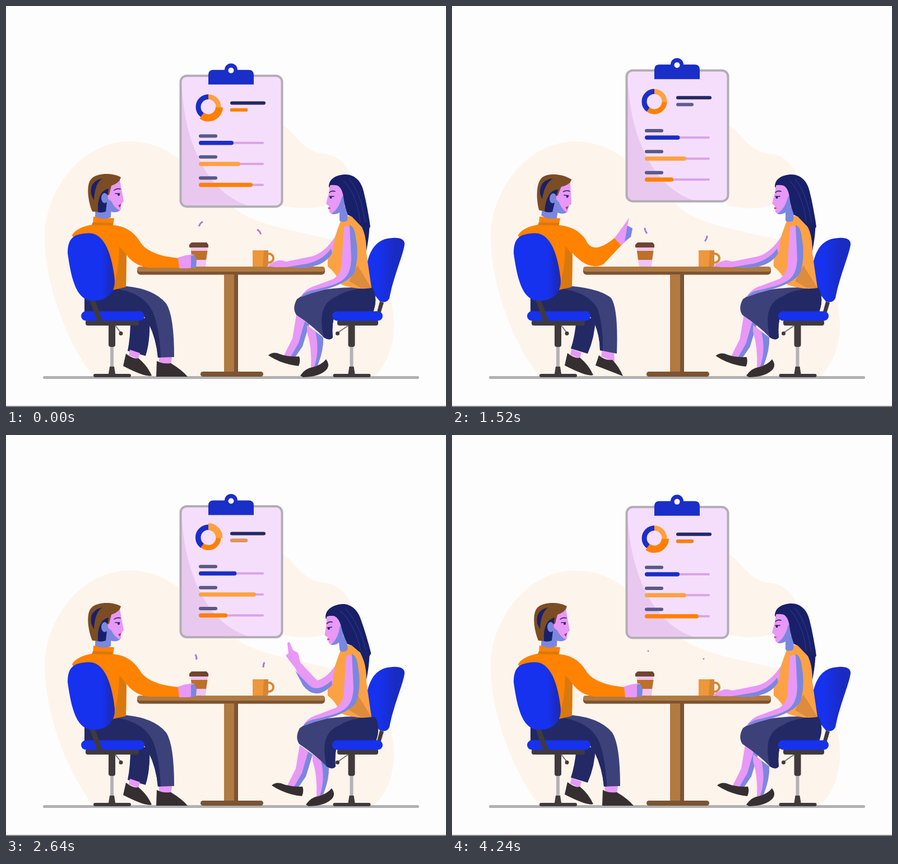
These frames come from a looping animation (785 by 714 pixels, 4.32 s). An HTML page:

```html
<!DOCTYPE html>
<html lang="en">
<head>
<meta charset="utf-8">
<title>Meeting</title>
<style>
html, body { margin: 0; height: 100%; overflow: hidden; background: #fdfdfd }
svg { display: block; width: 785px; height: 714px }
.skin { fill: #e898f7 } .cool { fill: #7b87df } .pink { fill: #efc3f5 }
.navy { fill: #3c4179 } .deep { fill: #232965 } .shoe { fill: #352f31 }
.blue { fill: #1632ee } .dark { fill: #403a3d }
.orange { fill: #ff8200 } .rust { fill: #d9780f } .peach { fill: #fca245 } .tan { fill: #dd8b3c }
.wood { fill: #b07a42 } .edge { fill: #7c5433 } .hair { fill: #18206a }
.thin { fill: none; stroke-linecap: round; stroke-width: 1.6; stroke: #2a2560 }
</style>
</head>
<body>
<svg viewBox="0 0 785 714">
  <linearGradient id="backL"><stop offset=".72" stop-color="#1632ee"/><stop offset=".92" stop-color="#1a2bbd"/></linearGradient>
  <linearGradient id="backR"><stop offset=".3" stop-color="#1632ee"/><stop offset=".75" stop-color="#1a2bc4"/></linearGradient>
  <path fill="#fdf4ec" d="M158 661C128 630 70 520 69 410C70 330 132 242 220 241C275 243 296 262 330 290L412 364C460 398 560 405 620 428C668 450 688 505 692 560C694 600 680 640 655 661ZM490 210C520 225 525 262 575 264C600 272 615 290 618 315C602 350 560 370 490 355Z"/>
  <rect x="66" y="659" width="671" height="5" rx="2.5" fill="#b2b0b2"/>
  <rect y="712" width="785" height="2" fill="#858585"/>

  <g id="board">
    <rect x="311.500" y="123.500" width="181" height="233" rx="11" fill="#f5defc"/>
    <path fill="#e9c8f0" d="M313 135C318 245 360 335 436 356H324Q313 356 313 344Z"/>
    <rect x="311.500" y="123.500" width="181" height="233" rx="11" fill="none" stroke="#b3adb5" stroke-width="4"/>
    <path fill="#1a2ec8" d="M361 139V122Q361 113 370 113H390A11.500 11.500 0 0 1 413 113H433Q442 113 442 122V139Z"/>
    <circle cx="401.500" cy="114" r="5" fill="#fdf6ff"/>
    <g id="content"></g>
  </g>

  <!-- woman -->
  <path fill="url(#backR)" d="M643 465C648 435 660 414 690 413C704 412 712 416 711 425C708 445 692 480 684 520Q680 530 667 526L646 500Z"/>
  <path class="dark" d="M667 526L674 528L668 548H661Z"/>
  <g id="lap">
    <g id="farFoot">
      <path class="skin" d="M518 550L540 566L528 605L514 628L496 622L511 592Z"/>
      <path class="cool" d="M533 562L541 567L529 606L514 628L507 626L522 600Z"/>
      <path class="shoe" d="M468 622Q474 616 484 618Q500 625 523 624Q526 632 522 641Q492 638 468 622Z"/>
    </g>
    <g id="nearFoot">
      <path class="skin" d="M537 568L566 590Q567 612 556 640L544 644Q546 608 537 580Z"/>
      <path class="cool" d="M552 580L566 590Q567 612 556 640L550 642Q560 612 552 580Z"/>
      <path class="shoe" d="M525 658Q534 645 547 643Q563 639 571 629Q578 638 573 646Q562 660 530 661Z"/>
    </g>
    <path class="navy" d="M535 511Q590 498 654 502Q664 520 655 545H590Q580 560 583 590Q578 597 567 590Q548 570 518 550Q510 538 519 522Z"/>
    <path class="deep" d="M590 517Q610 503 654 502Q664 520 655 545H590Q580 560 583 590Q578 597 567 590C560 560 560 528 590 517Z"/>
  </g>
  <path class="hair" d="M625 370L648 380Q650 400 643 436Q638 420 637 400Z"/>
  <path class="peach" d="M598 380Q612 370 622 377Q644 395 643 440L652 502Q625 506 598 496Q588 474 574 464Q572 446 586 414Q592 396 598 380Z"/>
  <path class="tan" d="M627 462L652 502H633L612 490Z"/>
  <g id="herHead">
    <path class="hair" d="M576 322C576 306 592 300 606 300C622 300 634 312 638 330C643 350 647 372 650 393L643 402L618 376L600 352Z"/>
    <path class="cool" d="M595 350L612 345L609 382Q600 387 595 382Z"/>
    <path class="skin" d="M578 318L576 333L571 352L576 356L577 367Q584 374 596 367L608 352Q610 332 596 320Z"/>
    <path class="cool" d="M600 338L610 342L600 364Q590 373 580 370Q594 362 600 338Z"/>
    <path class="hair" d="M576 320Q598 312 602 340Q604 356 610 372L628 380L626 320L600 304L580 310Z"/>
    <path class="thin" d="M577 332Q581 328 587 330M577 339L585 339"/>
    <circle class="hair" cx="579.500" cy="341" r="2"/>
    <path d="M575 358L580 360L575 362Z" fill="#c0407c"/>
    <path d="M603 312Q626 335 632 385M612 308Q634 335 641 386" fill="none" stroke="#27327f" stroke-width="1.500"/>
  </g>

  <!-- table -->
  <rect class="edge" x="234" y="465" width="335" height="13.500" rx="6"/>
  <rect class="wood" x="234" y="464" width="335" height="9" rx="4.500"/>
  <rect class="wood" x="389" y="478" width="25" height="174"/>
  <rect class="edge" x="407" y="478" width="7" height="174"/>
  <rect class="edge" x="347" y="651" width="112" height="9" rx="4.500"/>
  <g id="steam"></g>
  <circle cx="469" cy="449" r="8" fill="none" stroke="#d98633" stroke-width="4"/>
  <path d="M440 435H468V460Q468 464 464 464H440Z" fill="#ee973b"/>
  <path d="M460 435H468V460Q468 464 464 464H458Z" fill="#d98633"/>
  <path class="pink" d="M329 429H360L356 464H334Z"/>
  <path d="M330 436H359.500L357 452H332Z" fill="#bd7027"/>
  <path d="M331 421H358L361 425V430H327V425Z" fill="#70452f"/>
  <path id="herArm" class="skin"/>
  <path id="herArmShade" class="cool"/>
  <g id="nearArm">
    <path class="skin" d="M603 394Q616 386 622 407Q630 438 623 466Q620 490 572 504L546 511L526 518Q534 503 552 498L584 486Q600 476 599 452Z"/>
    <path class="cool" d="M613 390Q622 393 624 412Q630 440 623 470Q618 490 572 504L546 511L526 518Q532 508 552 505C596 494 614 490 616 450Z"/>
  </g>

  <!-- man -->
  <path id="farLeg" class="deep"/>
  <g id="hisFarFoot">
    <path class="skin" d="M221 612L239 618L236 629L219 622Z"/>
    <path class="shoe" d="M214 619Q228 630 236 627Q252 640 260 658Q250 662 209 641Z"/>
  </g>
  <path id="hisAnkle" class="skin"/>
  <path id="hisShoe" class="shoe"/>
  <path id="nearLeg" class="navy"/>
  <path id="legShade" class="deep"/>
  <path class="orange" d="M118 408Q126 394 155 389L156 375L193 378L191 390Q206 391 216 402L215 440L214 500Q190 508 150 500Z"/>
  <path class="rust" d="M155 385L191 386L190 391L153 390ZM202 428Q214 440 215 446L214 500L190 506Q202 470 202 428Z"/>
  <g id="hisHead">
    <path class="cool" d="M160 350H188L187 376Q174 382 159 375Z"/>
    <path class="skin" d="M185 318L203 309L206 326L210 348L205 353L205 362Q202 368 188 366L180 345Z"/>
    <path class="cool" d="M178 340L188 348Q194 360 203 364Q196 370 184 365Z"/>
    <path fill="#7b4d25" d="M154 366C147 350 141 316 154 306C166 297 190 297 205 305Q203 315 188 320L184 336Q168 340 166 367Z"/>
    <path class="hair" d="M152 336Q148 312 172 307Q158 316 157 346ZM164 367Q162 330 183 325L181 340L178 366Q170 369 164 367Z"/>
    <ellipse class="cool" cx="176" cy="342" rx="6" ry="9"/>
    <path class="thin" d="M193 328Q198 324 204 326M195 334L203 334"/>
    <circle class="hair" cx="201" cy="336" r="2"/>
    <path d="M200 355L206 352L203 359Z" fill="#a63480"/>
  </g>
  <path id="hisSleeve" class="orange"/>
  <path id="hisHand" class="skin"/>
  <path id="hisHandShade" class="cool"/>
  <g id="chairs"></g>
  <path class="dark" d="M148 520L158 522L173 562H163Z"/>
  <path fill="url(#backL)" d="M110 440C110 416 118 405 148 404.500C178 404 190 450 194 488C195 514 176 525 155 525C130 524 118 500 110 440Z"/>
</svg>
<script>
const LOOP = 4320, STEP = 80;
const $ = id => document.getElementById(id);
const numbers = /-?\d+(\.\d+)?/g;

function add(parent, tag, attrs) {
  const el = document.createElementNS('http://www.w3.org/2000/svg', tag);
  for (const k in attrs) el.setAttribute(k, attrs[k]);
  return parent.appendChild(el);
}
const set = (id, k, v) => $(id).setAttribute(k, v);
const move = (id, x, y = 0) => set(id, 'transform', `translate(${x} ${y})`);

// Blend two paths that share one structure
function mix(a, b, k) {
  const to = b.match(numbers);
  let i = 0;
  return a.replace(numbers, v => +v + (to[i++] - v) * k);
}
// Smooth value from time, value, time, value ...
function key(t, ...p) {
  if (t <= p[0]) return p[1];
  for (let i = 2; i < p.length; i += 2) if (t < p[i]) {
    const k = (t - p[i - 2]) / (p[i] - p[i - 2]);
    return p[i - 1] + (p[i + 1] - p[i - 1]) * k * k * (3 - 2 * k);
  }
  return p[p.length - 1];
}

const poses = {
  hisSleeve: [
    'M196 391Q222 394 238 418Q252 444 308 449L310 466L255 466Q222 462 207 430Z',
    'M196 391Q222 394 238 415Q247 446 296 424L303 438L267 462Q240 472 207 430Z',
    'M196 391Q222 394 238 415Q250 446 290 413L302 426L270 460Q240 474 207 430Z'],
  hisHand: [
    'M307 448L320 444L335 442L340 452L339 465L325 467L309 467Z',
    'M296 424L311 408L324 401L323 413L327 427L318 432L302 438Z',
    'M290 413L304 394L316 377L313 391L322 396L319 411L302 426Z'],
  hisHandShade: [
    'M330 445L336 443L340 452L339 465L330 467Z',
    'M319 419L323 413L327 427L318 432L308 435Z',
    'M312 397L313 391L322 396L319 411L308 419Z'],
  herArm: [
    'M587 411Q568 440 545 446L500 455L492 453L486 453L480 455Q472 458 466 463L472 464L480 465L490 465L505 465L530 466Q568 464 582 440Z',
    'M587 411Q572 433 555 437L525 405L521 388L512 383L507 371Q503 366 502 372L504 388L499 393L506 402L516 415L530 446Q553 475 582 445Z'],
  herArmShade: [
    'M500 465L530 466Q568 464 582 440L580 432Q562 456 530 460Z',
    'M516 420L530 446Q553 475 582 445L581 437Q556 460 540 445Z'],
  nearLeg: [
    'M140 520Q170 497 215 499Q265 504 286 530Q300 552 300 625L271 626Q268 590 252 560L240 545L140 545Z',
    'M140 520Q170 497 215 499Q265 504 284 520Q297 540 294 619L264 613Q264 585 252 560L240 545L140 545Z'],
  legShade: [
    'M140 518Q160 498 200 504Q246 512 262 545Q274 575 276 626L271 626Q268 590 252 560L240 545L140 545Z',
    'M140 518Q160 498 200 504Q246 512 260 540Q270 570 269 614L264 613Q264 585 252 560L240 545L140 545Z'],
  farLeg: [
    'M222 558L256 555Q258 595 249 623L217 614Q222 590 222 558Z',
    'M222 558L256 555Q255 590 242 619L212 610Q219 590 222 558Z'],
  hisAnkle: ['M273 624L296 625L294 638L273 636Z', 'M268 612L289 618L290 634L266 624Z'],
  hisShoe: [
    'M269 632Q280 638 294 636Q314 648 324 660L268 660Z',
    'M262 622Q274 632 286 630Q298 642 305 659Q296 663 256 640Z'.replace('Q296 663 256 640', 'L256 640')]
};
function pose(id, k) {
  const p = poses[id], i = Math.min(Math.floor(k), p.length - 2);
  set(id, 'd', mix(p[i], p[i + 1], k - i));
}

// Chairs
for (const [x, left, width, lever, seat, seatWidth] of [[189, 142, 95, 16, 134, 113], [616.5, 591, 73, -25, 582, 90]]) {
  const g = $('chairs');
  add(g, 'rect', { class: 'dark', x: left, y: 559, width, height: 10, rx: 4 });
  add(g, 'rect', { class: 'blue', x: seat, y: 543.5, width: seatWidth, height: 17, rx: 8.5 });
  add(g, 'rect', { fill: '#b5b2b6', x: x - 3, y: 600, width: 6, height: 56 });
  add(g, 'rect', { class: 'dark', x: x - 6, y: 566, width: 12, height: 41, rx: 4 });
  add(g, 'path', { d: `M${x + Math.sign(lever) * 6} 569L${x + lever} 582`, stroke: '#777', 'stroke-width': 2 });
  add(g, 'circle', { class: 'dark', cx: x + lever, cy: 583, r: 3.5 });
  add(g, 'path', { class: 'dark', d: `M${x - 6} 655L${x - 4} 642H${x + 4}L${x + 6} 655Z` });
  add(g, 'rect', { class: 'dark', x: x - 33, y: 655, width: 67, height: 6, rx: 3 });
}

// Clipboard content
const colors = ['#1a2ec8', '#ffa13f', '#ff8000'];
const slices = [[217, 143], [0, 92], [92, 125]];
const content = $('content');
const bar = (x, y, height, fill) =>
  add(content, 'rect', { x, y: y - height / 2, height, rx: height / 2, fill });
const ring = slices.map((s, i) => add(content, 'circle', {
  cx: 361, cy: 179, fill: 'none', stroke: colors[i], pathLength: 360, transform: 'rotate(-90 361 179)'
}));
const title = bar(400, 172, 6, '#252963');
const subtitle = ['#5e608c', ...colors].map(c => bar(400, 184.3, 6, c));
const rows = colors.map((c, i) => {
  const y = 230.8 + i * 37.4;
  return [bar(344, y, 6, '#575a86'), bar(344, y + 12.3, 4, '#d9a3e6'), bar(344, y + 12.3, 7.5, c)];
});
const widen = (el, w) => el.setAttribute('width', w);

function drawBoard(t) {
  move('board', 0, -1.9 + 7.6 * Math.cos((t - 390) / 1000 * Math.PI));
  const u = t < 320 ? t + LOOP : t;
  const lift = [
    key(u, 1500, 0, 1800, 1, 2400, 1, 2720, 0),
    key(u, 2400, 0, 2720, 1, 3500, 1, 3800, 0),
    key(u, 3500, 0, 3800, 1)];
  const turn = key(u, 340, 0, 900, 1), head = key(u, 500, 0, 800, 1);
  const label = key(u, 680, 0, 960, 1), track = key(u, 800, 0, 1200, 1), fill = key(u, 940, 0, 1250, 1);
  slices.forEach(([start, size], i) => {
    const el = ring[i];
    el.setAttribute('r', 18 + lift[i] * 1.5);
    el.setAttribute('stroke-width', 9 + lift[i] * 4);
    el.setAttribute('stroke-dasharray', `${size * turn} 400`);
    el.setAttribute('stroke-dashoffset', -start * turn);
    widen(rows[i][0], 33 * label);
    widen(rows[i][1], 116 * track);
    widen(rows[i][2], ([62, 74, 51][i] + [34, 33, 45][i] * lift[i]) * fill);
  });
  widen(title, 63 * head);
  subtitle.forEach((el, i) => {
    widen(el, 31 * head);
    if (i) el.setAttribute('opacity', lift[i - 1]);
  });
}

// Steam: start, duration, route
const routes = [
  'M349 424C352 415 350 408 346 402C342 396 344 388 351 384',
  'M339 421C334 412 335 408 338 403C342 398 339 390 334 387'];
const puffs = [[-1040, 1300, 0], [800, 1300, 0], [1750, 1300, 1], [2800, 1500, 0]].map(([start, span, r]) => ({
  start, span,
  lines: ['', 'translate(799 14) scale(-1 1)'].map(transform => add($('steam'), 'path', {
    d: routes[r], transform, pathLength: 100, fill: 'none', stroke: '#b27acb', 'stroke-width': 3
  }))
}));

function drawSteam(t) {
  for (const { start, span, lines } of puffs) {
    const k = (t - start) / span, end = 125 * k;
    for (const el of lines) {
      el.style.display = k > 0 && k < 1 ? '' : 'none';
      el.setAttribute('stroke-dasharray', `0 ${Math.max(0, end - 25)} ${Math.min(25, end)} 300`);
    }
  }
}

function drawPeople(t) {
  const tap = Math.max(0, Math.cos((t / 960 - 0.417) * 2 * Math.PI));
  const reach = key(t, 720, 0, 1000, 1, 1360, 2, 2080, 2, 2400, 0);
  const lean = key(t, 1000, 0, 1500, 1, 2100, 1, 2400, 0);
  const reply = key(t, 2240, 0, 2560, 1, 3600, 1, 3960, 0);
  const step = Math.max(tap, lean);

  for (const id of ['hisSleeve', 'hisHand', 'hisHandShade']) pose(id, reach);
  for (const id of ['nearLeg', 'legShade', 'hisAnkle', 'hisShoe']) pose(id, lean);
  pose('farLeg', step);
  move('hisFarFoot', -8 * step, -step);
  set('hisHead', 'transform', `rotate(${7 * lean} 175 376)`);

  pose('herArm', reply);
  pose('herArmShade', reply);
  set('herHead', 'transform', `rotate(${-6 * reply} 613 378)`);
  move('lap', 5 * reply);
  move('nearFoot', 5 * reply);
  move('nearArm', 4 * reply);
  move('farFoot', 5 * tap * (1 - reply) + reply, 2 * Math.max(tap, reply));
}

function frame() {
  const t = Math.floor(performance.now() % LOOP / STEP) * STEP;
  drawBoard(t);
  drawSteam(t);
  drawPeople(t);
  requestAnimationFrame(frame);
}
frame();
</script>
</body>
</html>
```
